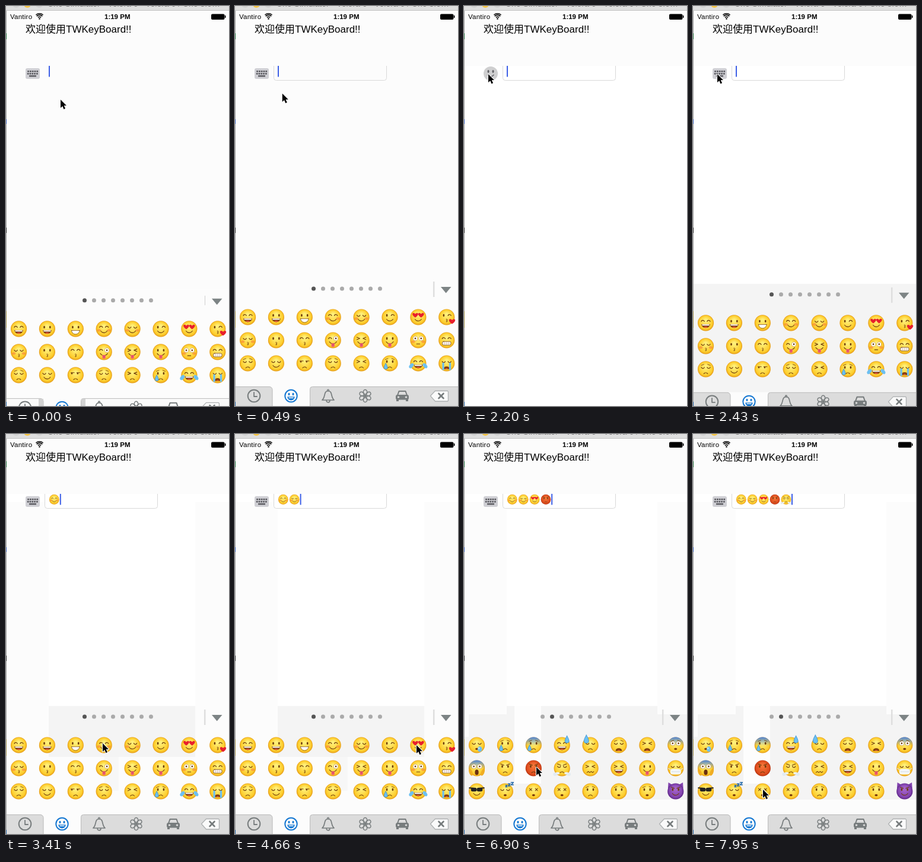
Animation, 376 px wide and 675 px high, one loop 8 s. Source, as an HTML page with a canvas:

```html
<!DOCTYPE html>
<html lang="zh-CN">
<head>
<meta charset="utf-8">
<title>Emoji keyboard</title>
<style>
html, body { margin: 0; width: 100%; height: 100%; overflow: hidden; background: #fcfcfc; }
#stage { position: relative; width: 376px; height: 675px; overflow: hidden; }
canvas { position: absolute; left: 0; top: 0; }
span { position: absolute; white-space: pre; color: #000; font: 11.5px/14px "Liberation Sans", Arial, sans-serif; }
#bar { left: 70px; top: -12px; color: #777; font-size: 14px; line-height: 16px; }
#net { left: 7px; top: 11px; letter-spacing: .25px; }
#clock { left: 166px; top: 11px; font-weight: bold; }
#hello { left: 33px; top: 26px; font: 17px/24px "Liberation Sans", "Noto Sans CJK SC", "Noto Sans CJK", sans-serif; }
#hello i { font: 300 17px/24px "Noto Sans CJK SC", "Noto Sans CJK", sans-serif; }
</style>
</head>
<body>
<div id="stage">
  <canvas id="view" width="376" height="675"></canvas>
  <span id="bar">Uno Simulator - Velora 6 - Velora 6 / Uno 8.0…</span>
  <span id="net">Vantiro</span>
  <span id="clock">1:19 PM</span>
  <span id="hello"><i>欢迎使用</i>TWKeyBoard!!</span>
</div>
<script>
const LOOP = 8000, W = 376, H = 675, TAU = Math.PI * 2;
const c = document.getElementById('view').getContext('2d');

// Each face: eyes, mouth, then extras
const PAGES = [
  'aD oD oG aur cur wu hu wkL ckr ok ak iT >T oT b-r ag cn/ cu fn cn/ >n on/t aDJ cwS',
  'coq on/t on/tB aDd cnl cw/ >w bo/B bOBH on! on!R cn!e >W >D oT c-M su coZ xo xo on/ oo/ oo/ ou!P'
].map(p => p.split(' '));

const POINTER = [[0, 92, 158], [300, 90, 155], [820, 62, 135], [1250, 42, 118], [1700, 42, 118],
  [2100, 41, 115], [2560, 41, 115], [2800, 75, 230], [3050, 142, 450], [3230, 163, 522], [3560, 163, 522],
  [3850, 211, 522], [4120, 211, 522], [4350, 269, 526], [4600, 306, 525], [4980, 306, 525],
  [5250, 290, 580], [5540, 248, 590], [5720, 248, 575], [5890, 5, 547], [6150, 6, 548],
  [6550, 106, 562], [6680, 122, 562], [6920, 122, 562], [7150, 167, 562], [7450, 166, 562],
  [7750, 130, 590], [7950, 118, 600]];
const SCROLL = [[5720, 0], [5890, 243], [5960, 310], [6050, 355], [6180, 376]];
const TYPED = [[3410, 'aur'], [4110, 'cur'], [4920, 'hu'], [6820, 'on!R'], [7410, 'cn!e']];
const HIDE = 1393, SHOW = 2205, KEYS_H = 216;

function track(keys, t) {
  const i = keys.findIndex(k => k[0] > t);
  if (i < 0) return keys[keys.length - 1].slice(1);
  if (!i) return keys[0].slice(1);
  const a = keys[i - 1], b = keys[i], p = (t - a[0]) / (b[0] - a[0]);
  return a.slice(1).map((v, j) => v + (b[j + 1] - v) * p);
}
const unit = p => Math.max(0, Math.min(1, p));

function rect(x, y, w, h, col) { c.fillStyle = col; c.fillRect(x, y, w, h); }
function oval(x, y, rx, ry, col) {
  c.beginPath(); c.ellipse(x, y, rx, ry, 0, 0, TAU); c.fillStyle = col; c.fill();
}
function stroke(w, col) { c.lineWidth = w; c.strokeStyle = col; c.stroke(); }
function arc(x, y, r, a, b, w, col) { c.beginPath(); c.arc(x, y, r, a * Math.PI, b * Math.PI); stroke(w, col); }
function poly(pts, col, w) {
  c.beginPath();
  for (let i = 0; i < pts.length; i += 2) c.lineTo(pts[i], pts[i + 1]);
  if (w) return stroke(w, col);
  c.closePath(); c.fillStyle = col; c.fill();
}
function round(x, y, w, h, r, col, line) {
  c.beginPath(); c.roundRect(x, y, w, h, r);
  if (col) { c.fillStyle = col; c.fill(); }
  if (line) stroke(1, line);
}
function heart(x, y, s, col) {
  c.beginPath();
  c.moveTo(x, y + s);
  c.bezierCurveTo(x - s * 2, y - s * .3, x - s * .9, y - s * 1.4, x, y - s * .4);
  c.bezierCurveTo(x + s * .9, y - s * 1.4, x + s * 2, y - s * .3, x, y + s);
  c.fillStyle = col; c.fill();
}
function drop(x, y, s) {
  c.beginPath(); c.moveTo(x, y - s * 1.7);
  c.quadraticCurveTo(x + s * 1.6, y + s, x, y + s);
  c.quadraticCurveTo(x - s * 1.6, y + s, x, y - s * 1.7);
  c.fillStyle = '#6cc0f2'; c.fill(); stroke(.05, '#2b86cf');
}

const INK = '#6e3d0c', RED = '#e8202c', BLUE = '#6cc0f2';

function skin(ex) {
  const tones = ex.includes('R') ? ['#f5773a', '#df4d1e', '#b83410']
    : ex.includes('P') ? ['#a766cc', '#8243ae', '#5b2485'] : ['#fff07c', '#fdcd2c', '#e49a18'];
  if (ex.includes('P')) for (const s of [-1, 1]) poly([s * .9, -1.1, s * .95, -.35, s * .4, -.8], tones[1]);
  const g = c.createRadialGradient(0, -.35, .1, 0, 0, 1);
  g.addColorStop(0, tones[0]); g.addColorStop(.8, tones[1]); g.addColorStop(1, tones[2]);
  oval(0, 0, 1, 1, g);
  if (ex.includes('B')) {
    const b = c.createLinearGradient(0, -1, 0, .1);
    b.addColorStop(0, '#4a82dc'); b.addColorStop(1, 'rgba(110,160,220,0)');
    oval(0, 0, 1, 1, b);
  }
  if (ex.includes('r')) for (const s of [-1, 1]) oval(s * .62, .18, .23, .16, 'rgba(245,95,60,.42)');
}

function eye(kind, s) {
  const x = s * .36, y = -.22;
  if (kind === 'w') kind = s < 0 ? 'o' : 'a';
  if (kind === 'i') kind = s < 0 ? 'a' : 'b';
  if (kind === 'a') arc(x, y + .1, .2, 1.1, 1.9, .09, INK);
  else if (kind === 'c') arc(x, y - .08, .2, .1, .9, .09, INK);
  else if (kind === 'o') oval(x, y, .1, .16, INK);
  else if (kind === 'h') heart(x, y - .05, .32, RED);
  else if (kind === 'b') { oval(x, y, .28, .28, '#fff'); arc(x, y, .28, 0, 2, .04, '#b98430'); oval(x, y, .1, .11, INK); }
  else if (kind === 'f') { oval(x - .1, y + .02, .09, .1, INK); poly([x - .22, y - .08, x + .2, y - .08], INK, .08); }
  else if (kind === 'x') { poly([x - .14, y - .14, x + .14, y + .14], INK, .08); poly([x + .14, y - .14, x - .14, y + .14], INK, .08); }
  else if (kind === '>') poly([x + s * .2, y - .15, x - s * .16, y, x + s * .2, y + .15], INK, .09);
  else if (kind === 's') { round(x - .36, y - .22, .72, .46, .2, '#222'); poly([x - s * .2, y - .16, x + s * .55, y - .2], '#222', .14); }
}

function mouth(kind) {
  const half = (y, r, col, up) => {
    c.beginPath(); c.ellipse(0, y, r, r * .85, 0, up ? Math.PI : 0, up ? TAU : Math.PI);
    c.closePath(); c.fillStyle = col; c.fill();
  };
  if (kind === 'D') { half(.16, .54, '#7a3a0c'); rect(-.45, .18, .9, .15, '#fff'); oval(0, .52, .23, .08, '#e0553e'); }
  else if (kind === 'G') { half(.2, .5, '#fff'); arc(0, .18, .5, 0, 1, .05, INK); poly([-.5, .2, .5, .2], INK, .05); }
  else if (kind === 'u') arc(0, .02, .46, .17, .83, .08, INK);
  else if (kind === 'n') arc(0, .75, .3, 1.2, 1.8, .08, INK);
  else if (kind === 'k') { arc(0, .34, .09, 1.3, 2.5, .07, INK); arc(0, .51, .08, 1.5, 2.7, .07, INK); }
  else if (kind === 'T') {
    arc(0, -.08, .52, .17, .83, .08, INK);
    round(-.2, .38, .4, .46, [0, 0, .2, .2], '#ee5f72'); poly([0, .42, 0, .64], '#c43a50', .05);
  }
  else if (kind === 'o') oval(0, .48, .18, .13, '#7a3a0c');
  else if (kind === 'O') oval(0, .5, .23, .34, '#6a3010');
  else if (kind === '-') poly([-.2, .46, .2, .46], INK, .08);
  else if (kind === 'W') poly([-.42, .52, -.25, .4, -.08, .54, .1, .4, .26, .54, .42, .42], INK, .08);
  else if (kind === 'w') { half(.72, .4, '#7a3a0c', true); oval(0, .65, .18, .06, '#e0553e'); }
  else if (kind === 'g') {
    round(-.54, .16, 1.08, .44, .18, '#fff');
    c.beginPath(); c.roundRect(-.54, .16, 1.08, .44, .18); stroke(.06, INK);
    for (let i = -1; i < 2; i++) poly([i * .26, .18, i * .26, .58], '#b98c60', .03);
    poly([-.52, .38, .52, .38], '#b98c60', .03);
  }
}

const EXTRA = {
  '/': () => [-1, 1].forEach(s => poly([s * .22, -.6, s * .56, -.47], INK, .06)),
  '!': () => [-1, 1].forEach(s => poly([s * .14, -.36, s * .56, -.54], INK, .08)),
  L: () => heart(.68, .5, .34, RED),
  t: () => drop(-.5, .45, .27),
  d: () => drop(.62, -.6, .33),
  l: () => drop(-.5, -.62, .38),
  J: () => [-1, 1].forEach(s => { c.save(); c.translate(s * .85, .3); c.rotate(s * -.7); oval(0, 0, .22, .36, BLUE); c.restore(); }),
  S: () => [-1, 1].forEach(s => round(s * .42 - .12, -.1, .24, .95, .1, BLUE)),
  q: () => { oval(.38, .5, .28, .33, BLUE); oval(.28, .4, .08, .1, '#d5efff'); },
  e: () => [-1, 1].forEach(s => { oval(s * .55, .62, .25, .15, '#eef3f8'); oval(s * .85, .75, .24, .2, '#e2ebf2'); }),
  H: () => [-1, 1].forEach(s => { c.save(); c.translate(s * .75, .5); c.rotate(s * .35); oval(0, 0, .2, .46, '#f0ad22'); c.restore(); }),
  M: () => { round(-.66, .1, 1.32, .68, .28, '#f5f7f8'); poly([-.9, .02, -.6, .2], '#dde', .08); poly([.9, .02, .6, .2], '#dde', .08); poly([-.5, .43, .5, .43], '#c6d0d8', .05); },
  Z: () => [[.15, -.65, .2], [.5, -.8, .26], [.88, -.95, .3]].forEach(([x, y, s]) =>
    poly([x - s / 2, y - s / 2, x + s / 2, y - s / 2, x - s / 2, y + s / 2, x + s / 2, y + s / 2], '#2368a8', .11))
};

function face(spec, x, y, r) {
  const ex = spec.slice(2);
  c.save();
  c.translate(x, y); c.scale(r, r);
  c.lineCap = c.lineJoin = 'round';
  skin(ex);
  eye(spec[0], -1); eye(spec[0], 1);
  mouth(spec[1]);
  for (const k of ex) if (EXTRA[k]) EXTRA[k]();
  c.restore();
}

function header() {
  rect(0, 0, W, 8, '#dedede');
  rect(0, 7, W, 1, '#c4c4c4');
  [[17, '#d2d2d2'], [36, '#f6c648'], [56, '#d2d2d2']].forEach(([x, col]) => oval(x, -3, 6, 6, col));
  rect(0, 8, 1, H, '#a8a8a8');
  [[46, 10, '#2b7a45'], [191, 8, '#3f66c0'], [374, 9, '#333'], [515, 28, '#a99a58'], [668, 7, '#2e6aa8']]
    .forEach(([y, h, col]) => rect(0, y, 1, h, col));
  for (const r of [3.6, 6.8]) arc(56.5, 22, r, 1.25, 1.75, 1.7, '#000');
  arc(56.5, 22, 9.2, 1.27, 1.73, 1.4, '#000');
  oval(56.5, 21.5, 1.3, 1.3, '#000');
  round(346, 13.5, 22.5, 9.5, 2, '#000');
  rect(369, 16, 1.5, 4, '#000');
}

function toggle(smiley) {
  if (smiley) {
    oval(45, 114, 12, 12, '#cfcfd0');
    oval(41, 110.5, 1.5, 2.4, '#626266'); oval(49, 110.5, 1.5, 2.4, '#626266');
    arc(45, 113, 6, .15, .85, 1.5, '#626266');
    return;
  }
  round(33, 105, 24, 18, 3, '#cfcfd4');
  for (let r = 0; r < 2; r++) for (let i = 0; i < 5; i++) rect(36.2 + i * 3.8 - r * .4, 109 + r * 4, 2.7, 2.6, '#58585e');
  rect(39, 117, 12, 2.4, '#58585e');
}

function field(t, typed) {
  c.save();
  c.beginPath(); c.rect(1, 101, W, 30); c.clip();
  if (t >= 30) round(65.5, 90.5, 190, 35, 4, t < 1700 ? '#fcfcfc' : '#fff', '#d9d9d9');
  typed.forEach((k, i) => face(k[1], 81.3 + i * 18.9, 110.5, 8.4));
  const away = t >= HIDE && t < 1700 || t >= SHOW && t < 2300;
  const since = typed.length ? typed[typed.length - 1][0] : t < HIDE ? 0 : t < SHOW ? 1700 : 2300;
  if (!away && (t - since) % 1000 < 600) rect(72 + typed.length * 18.8, 101, 2, 18.5, '#3d5fe6');
  c.restore();
}

function tabs(t) {
  const pale = t < 30, grey = pale ? '#fafafa' : '#dcdcdc', line = '#b9b9b9', ink = '#777c7d';
  rect(1, 642, W, 40, '#fcfcfc');
  round(-6, 642.5, 69, 50, 5, grey, line);
  round(126.5, 642.5, 260, 50, 4, grey, line);
  if (pale) { rect(55, 643, 8, 33, '#d2d2d2'); rect(127, 643, 7, 33, '#d2d2d2'); }
  c.save();
  c.lineCap = c.lineJoin = 'round';
  c.translate(32, 658);
  arc(0, 0, 10.3, 0, 2, 2, ink);
  poly([0, -6, 0, 1, 5, 1], ink, 1.8);
  c.translate(62.5, 0);
  const blue = '#1678d2';
  arc(0, 0, 10.2, 0, 2, 2, blue);
  oval(-3.5, -3, 1.5, 2.2, blue); oval(3.5, -3, 1.5, 2.2, blue);
  c.beginPath(); c.arc(0, 1.3, 6.2, 0, Math.PI); c.closePath(); c.fillStyle = blue; c.fill();
  rect(-4, 2.5, 8, 1.4, '#fff');
  c.translate(62.5, 0);
  c.beginPath(); c.moveTo(-10, 7); c.bezierCurveTo(-4, 2, -8, -8, 0, -8.5);
  c.bezierCurveTo(8, -8, 4, 2, 10, 7); c.closePath(); stroke(1.7, ink);
  arc(0, -9.5, 1.4, 0, 2, 1.4, ink); arc(0, 8, 2.8, 0, 1, 1.8, ink);
  c.translate(62.5, 0);
  for (let i = 0; i < 6; i++) {
    c.save(); c.rotate(i * TAU / 6);
    c.beginPath(); c.ellipse(0, -6.7, 3.2, 3.8, 0, 0, TAU); stroke(1.5, ink);
    c.restore();
  }
  oval(0, 0, 2.3, 2.3, ink);
  c.translate(62.5, 0);
  poly([-8, -1, -5.5, -8, 5.5, -8, 8, -1], ink, 2);
  round(-11, -2, 22, 8.5, 3, ink);
  rect(-10, 5, 4, 4, ink); rect(6, 5, 4, 4, ink);
  oval(-6.5, 2, 1.8, 1.6, '#ddd'); oval(6.5, 2, 1.8, 1.6, '#ddd');
  c.translate(62.5, 0);
  const key = [-15, 0, -7, -8.5, 14, -8.5, 15, -7, 15, 8, 14, 9, -7, 9, -15, 0];
  poly(key, '#fafafa'); poly(key, '#aeb1b2', 1.3);
  poly([-1, -4, 7, 4], ink, 2.6); poly([7, -4, -1, 4], ink, 2.6);
  c.restore();
}

function panel(t) {
  const soft = '#f4f4f4';
  if (t < SHOW) rect(1, 459, W, H, '#fcfcfc');
  else if (t < 2600) rect(1, 459, W, H, soft);
  else if (t < 5750) { rect(72, 459, 247, 86, soft); rect(166, 545, 24, 57, '#f7f7f7'); }
  else {
    rect(72, 459, 254, 52, soft); rect(1, 511, W, 106, soft);
    if (t > 6180) { rect(8, 473, 77, 40, soft); rect(326, 473, 50, 40, soft); rect(85, 459, 45, 131, '#fdfdfd'); }
  }
  const active = t > 6180 ? 1 : 0;
  for (let i = 0; i < 8; i++) oval(132.5 + i * 16, 477, 3.5, 3.5, i === active ? '#555' : '#aaa');
  if (t < 30) rect(335, 469, 1, 16, '#cfcfcf');
  else rect(334, 465, 2.5, 26, '#dedede');
  poly([347, 474, 364.5, 474, 355.7, 484.5], '#7d8485');
  const [shift] = track(SCROLL, t);
  PAGES.forEach((page, p) => page.forEach((spec, i) => {
    const x = 21.5 + (i % 8) * 47.9 + p * W - shift;
    if (x > -20 && x < W + 20) face(spec, x, 525 + Math.floor(i / 8) * 39, 13.6);
  }));
  tabs(t);
}

function sunk(t) {
  const rise = start => KEYS_H * (1 - unit((t - start) / 350)) ** 3;
  if (t < HIDE) return rise(-192);
  if (t >= SHOW) return rise(SHOW);
  const p = unit((t - HIDE) / 300);
  return KEYS_H * (p < .5 ? 4 * p ** 3 : 1 - 4 * (1 - p) ** 3);
}

function pointer(t) {
  const [x, y] = track(POINTER, t);
  const shape = [0, 0, 0, 14, 3.2, 11, 5.5, 16.2, 8, 15, 5.8, 10, 10, 10, 0, 0];
  c.save();
  c.translate(x, y); c.lineJoin = 'round';
  poly(shape, '#fff', 2); poly(shape, '#000');
  c.restore();
}

function draw(t) {
  rect(0, 0, W, H, '#fcfcfc');
  if (t >= 1700 && t < 2600) rect(1, 101, W, H, '#fff');
  if (t >= 2600) {
    rect(1, 101, W, 14, '#fff');
    rect(72, 115, t < 5000 ? 247 : 254, 344, '#fff');
  }
  field(t, TYPED.filter(k => k[0] <= t));
  toggle(t >= HIDE && t < SHOW);
  const down = sunk(t);
  if (down < KEYS_H) {
    c.save();
    c.beginPath(); c.rect(1, 101, W, H); c.clip();
    c.translate(0, down);
    panel(t);
    c.restore();
  }
  header();
  pointer(t);
}

let start;
function tick(now) {
  if (start === undefined) start = now;
  draw((now - start) % LOOP);
  requestAnimationFrame(tick);
}
draw(0);
requestAnimationFrame(tick);
</script>
</body>
</html>
```
